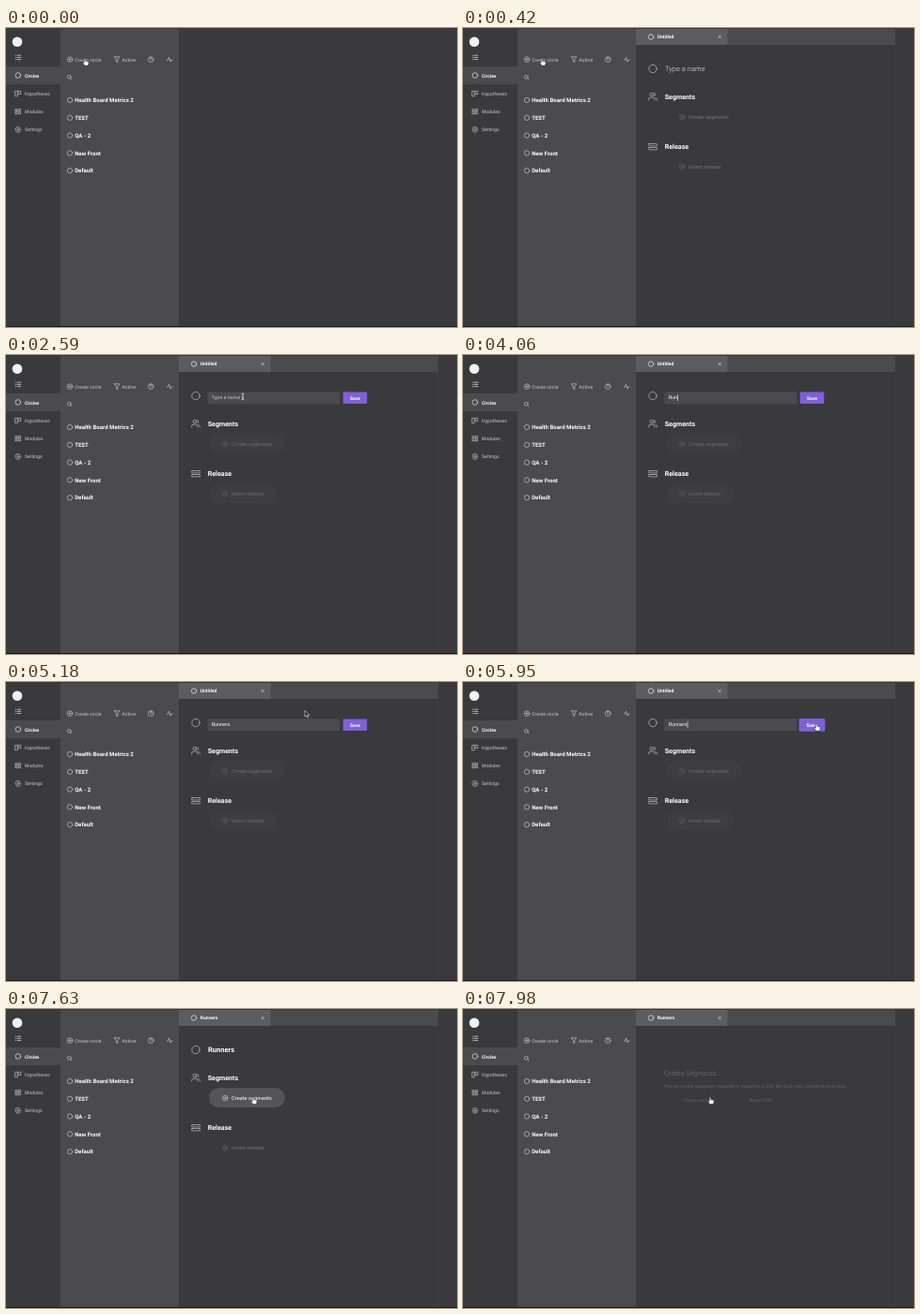
An HTML page for the animation above (8 s loop, 480 by 319 pixels).

```html
<!DOCTYPE html>
<html lang="en">
<head>
<meta charset="utf-8">
<title>Create a circle</title>
<style>
  html, body { margin: 0; width: 100%; height: 100%; overflow: hidden; background: #3a3a3c; }
  svg { display: block; width: 100vw; height: 100vh; }
  text { font-family: Roboto, Arial, sans-serif; font-size: 5.1px; fill: #c9c9cb; text-rendering: geometricPrecision; }
  .bold { font-weight: 700; fill: #fff; }
  .row { font-size: 6.05px; }
  .head { font-size: 7.15px; }
  .title { font-size: 7.55px; }
  .field { font-size: 5.4px; }
  .action { font-size: 5.6px; font-weight: 600; }
  .line { fill: none; stroke: #c9c9cb; stroke-width: .65; stroke-linecap: round; stroke-linejoin: round; }
  .bright { stroke: #f4f4f4; }
</style>
</head>
<body>
<svg viewBox="0 0 480 319" preserveAspectRatio="none">
  <defs>
    <g id="plus"><circle r="2.8"/><path d="M-1.4 0H1.4M0 -1.4V1.4"/></g>
  </defs>

  <rect width="480" height="319" fill="#3a3a3c"/>
  <path d="M58 319V2.5Q58 1 59.5 1H184V319Z" fill="#4b4b4d"/>
  <rect y="41" width="58" height="19" fill="#4b4b4d"/>

  <!-- side menu -->
  <circle cx="12" cy="14.8" r="5.3" fill="#f2f2f2"/>
  <g class="line">
    <path class="bright" d="M12 29.2H15.7M12 31.4H15.7M12 33.6H15.7M10.2 29.2H10.5M10.2 31.4H10.5M10.2 33.6H10.5"/>
    <circle class="bright" cx="12.8" cy="50.5" r="2.8"/>
    <path d="M10 67.3H12.2V72.8H10ZM13.4 67.3H15.7V70.6H13.4Z"/>
    <path d="M10.2 86.6H12.2V88.5H10.2ZM13.6 86.6H15.5V88.5H13.6ZM10.2 89.8H12.2V91.7H10.2ZM13.6 89.8H15.5V91.7H13.6Z"/>
    <path d="M11.5 105.7H14.1L15.7 108.4L14.1 111.1H11.5L9.9 108.4Z"/>
    <circle cx="12.8" cy="108.4" r="1"/>
  </g>
  <text class="bold" x="20" y="52.5" style="font-size:4.95px">Circles</text>
  <text x="20" y="71.8">Hypotheses</text>
  <text x="20" y="91">Modules</text>
  <text x="20" y="110.2">Settings</text>

  <!-- circle list -->
  <g class="line">
    <use href="#plus" x="68" y="33.6"/>
    <path d="M115.3 30.8H120.9L118.8 33.7V36.6L117.3 35.8V33.7Z"/>
    <circle cx="154.2" cy="33.6" r="2.9"/>
    <path d="M154.2 31.8V34.4M153.4 31.9H155"/>
    <path d="M171.3 34H172.5L173.5 31.2L174.9 36L175.8 34H177.2"/>
    <circle cx="67.3" cy="52.3" r="1.9"/><path d="M68.7 53.7L70 55"/>
  </g>
  <text x="73.2" y="35.5">Create circle</text>
  <text x="123.2" y="35.5" style="font-size:5.4px">Active</text>
  <g id="list"></g>

  <!-- workspace -->
  <g id="work">
    <rect x="184" y="1" width="276" height="17" fill="#4b4b4d"/>
    <rect x="184" y="1" width="97.5" height="17" fill="#5d5c61"/>
    <path d="M459.7 18V318" stroke="#444446" stroke-width=".6"/>
    <g class="line bright">
      <circle cx="200" cy="9.5" r="2.7"/>
      <path d="M271.9 8.2L274.4 10.8M274.4 8.2L271.9 10.8" stroke-width=".5"/>
    </g>
    <text class="bold" id="tab" x="206.7" y="11.4" style="font-size:5px"></text>
    <g id="form">
      <g class="line">
        <circle cx="202" cy="43.5" r="4.2"/>
        <circle cx="200.8" cy="71" r="1.8"/>
        <path d="M197.7 77V76Q197.7 74.2 199.5 74.2H202.2Q204 74.2 204 76V77M203.6 69.3A1.8 1.8 0 0 1 203.6 72.7M205 74.4Q206.6 74.8 206.6 77"/>
        <rect x="197.7" y="123.5" width="8.8" height="2.4" rx=".5"/>
        <rect x="197.7" y="127.5" width="8.8" height="2.4" rx=".5"/>
      </g>
      <text class="bold head" x="214.7" y="75.5">Segments</text>
      <text class="bold head" x="214.7" y="128.5">Release</text>
      <text class="title" id="title" x="214.9" y="46.3"></text>
      <g id="segments">
        <rect x="216" y="84.3" width="81" height="20.7" rx="10.35"/>
        <use class="line" href="#plus" x="233.2" y="95"/>
        <text class="action" x="240" y="97">Create segments</text>
      </g>
      <g id="release">
        <rect x="217" y="137.5" width="71.5" height="20.7" rx="10.35"/>
        <use class="line" href="#plus" x="233.2" y="148"/>
        <text class="action" x="240" y="150">Insert release</text>
      </g>
      <g id="edit">
        <rect x="214.5" y="39.3" width="140.7" height="12.9" rx=".8" fill="#4b4b4d"/>
        <text class="field" id="typed" x="218.8" y="47.4"></text>
        <rect id="caret" y="42.2" width=".6" height="6.8" fill="#fff"/>
        <g id="save">
          <rect x="-13.2" y="-5.9" width="26.4" height="13.4" rx="1.2" fill="#302d3a" opacity=".6"/>
          <rect x="-12.8" y="-6.3" width="25.6" height="12.6" rx="1" fill="#7f60da"/>
          <text class="bold" y="1.9" text-anchor="middle" style="font-size:5px">Save</text>
        </g>
      </g>
    </g>
    <g id="modal">
      <text class="title" x="214" y="70.7" style="font-size:7.3px">Create Segments</text>
      <text x="214" y="84" style="font-size:4.75px">You can create a segment manually or importing a .CSV file. Click each and see how to start.</text>
      <text x="235" y="99" style="font-size:4.7px">Create manually</text>
      <text x="304.5" y="99" style="font-size:4.7px">Import CSV</text>
    </g>
  </g>

  <rect y="318" width="480" height="1" fill="#18181a"/>

  <g id="cursor" stroke-linejoin="round">
    <path id="arrow" d="M0 0V6.4L1.5 5.1L2.5 7.3L3.6 6.8L2.6 4.7H4.6Z" fill="#111" stroke="#fff" stroke-width=".6"/>
    <path id="hand" d="M-.8 .3Q0 -.6 .7 .3V2.5L3.4 3.1Q4.3 3.4 4.1 4.4L3.4 7.3H-.3L-2.2 4.5Q-2 3.5 -.8 4.3Z" fill="#fff" stroke="#222" stroke-width=".5"/>
    <path id="beam" d="M-1.3 -3.3Q0 -3.3 0 -2.5Q0 -3.3 1.3 -3.3M0 -2.5V2.5M-1.3 3.3Q0 3.3 0 2.5Q0 3.3 1.3 3.3M-.8 .8H.8" fill="none" stroke="#fff" stroke-width=".75"/>
  </g>
</svg>
<script>
const LOOP = 8000;
const NAME = "Runners";
const KEY_TIMES = [3150, 3570, 4060, 4200, 4340, 4410, 4620];
const CARET_OFF = [[2590, 3150], [3780, 4060], [5150, 5680]];
const EDIT = [1890, 6230];
const MODAL = 7770;

// time, x, y of the pointer's hot spot
const PATH = [
  [0, 84, 32.8], [910, 84, 32.8], [1190, 234.2, 32], [1680, 252, 44.5],
  [4970, 252, 44.5], [5250, 330, 28], [5460, 398, 18], [5670, 376.2, 44.8],
  [6230, 376.2, 44.8], [6720, 354.2, 58.4], [7000, 290, 84], [7210, 263, 94.2]
];

const $ = id => document.getElementById(id);
const clamp = v => Math.max(0, Math.min(1, v));
const ramp = (t, from, to) => clamp((t - from) / (to - from));
const ease = p => p * p * (3 - 2 * p);
const within = (t, [from, to]) => t >= from && t < to;
const show = (id, on) => $(id).setAttribute("visibility", on ? "inherit" : "hidden");
const fade = (id, v) => $(id).setAttribute("opacity", v);

$("list").innerHTML = ["Health Board Metrics 2", "TEST", "QA - 2", "New Front", "Default"]
  .map((label, i) => {
    const y = 77 + i * 18.8;
    return `<circle class="line" cx="68" cy="${y}" r="2.7"/>
      <text class="bold row" x="73.2" y="${y + 2.2}">${label}</text>`;
  }).join("");

function pointerAt(t) {
  const i = PATH.findIndex(p => p[0] > t);
  if (i < 0) return PATH[PATH.length - 1].slice(1);
  const [a, b] = [PATH[i - 1], PATH[i]];
  const p = ease(ramp(t, a[0], b[0]));
  return [a[1] + (b[1] - a[1]) * p, a[2] + (b[2] - a[2]) * p];
}

function styleAction(id, active, pill, hover) {
  const [rect, icon, label] = $(id).children;
  rect.style.fill = hover ? "#555558" : active ? "#4c4c4e" : "#3e3e40";
  rect.style.opacity = active || pill ? 1 : 0;
  const ink = active ? "#cfcfd1" : pill ? "#5e5e61" : "#656568";
  icon.style.stroke = ink;
  label.style.fill = ink;
}

function drawPointer(t) {
  const [x, y] = pointerAt(t);
  $("cursor").setAttribute("transform", `translate(${x} ${y})`);
  show("cursor", !within(t, [3150, 4970]));
  const beam = within(t, [1540, 5040]);
  const hand = (t < 1190 && x < 104) || within(t, [5600, 6300]) || t >= 7070;
  show("beam", beam);
  show("hand", hand);
  show("arrow", !beam && !hand);
}

function drawForm(t) {
  const editing = within(t, EDIT);
  const saved = t >= EDIT[1];
  const count = KEY_TIMES.filter(k => k <= t).length;

  $("tab").textContent = saved ? NAME : "Untitled";
  $("title").textContent = editing ? "" : saved ? NAME : "Type a name";
  $("title").style.fontWeight = saved ? 700 : 400;
  $("title").style.fill = saved ? "#fff" : "#b4b4b6";

  show("edit", editing);
  const typed = $("typed");
  typed.textContent = count ? NAME.slice(0, count) : "Type a name";
  typed.style.fill = count ? "#fff" : "#c0c0c2";
  const caretX = 218.8 + (count ? typed.getComputedTextLength() + .2 : -.4);
  $("caret").setAttribute("x", caretX);
  show("caret", t >= 2060 && !CARET_OFF.some(w => within(t, w)));
  const grow = 1 + .09 * ease(ramp(t, 5530, 5740));
  $("save").setAttribute("transform", `translate(371.5 45.8) scale(${grow})`);

  styleAction("segments", saved, editing, t >= 7070);
  styleAction("release", false, editing, false);
}

function render(t) {
  show("work", t >= 70);
  fade("work", ease(ramp(t, 0, 420)));
  drawForm(t);
  fade("form", 1 - ramp(t, MODAL - 70, MODAL + 70));
  fade("modal", .3 * ramp(t, MODAL, LOOP - 20));
  drawPointer(t);
}

function tick(now) {
  render(now % LOOP);
  requestAnimationFrame(tick);
}
render(0);
requestAnimationFrame(tick);
</script>
</body>
</html>
```
